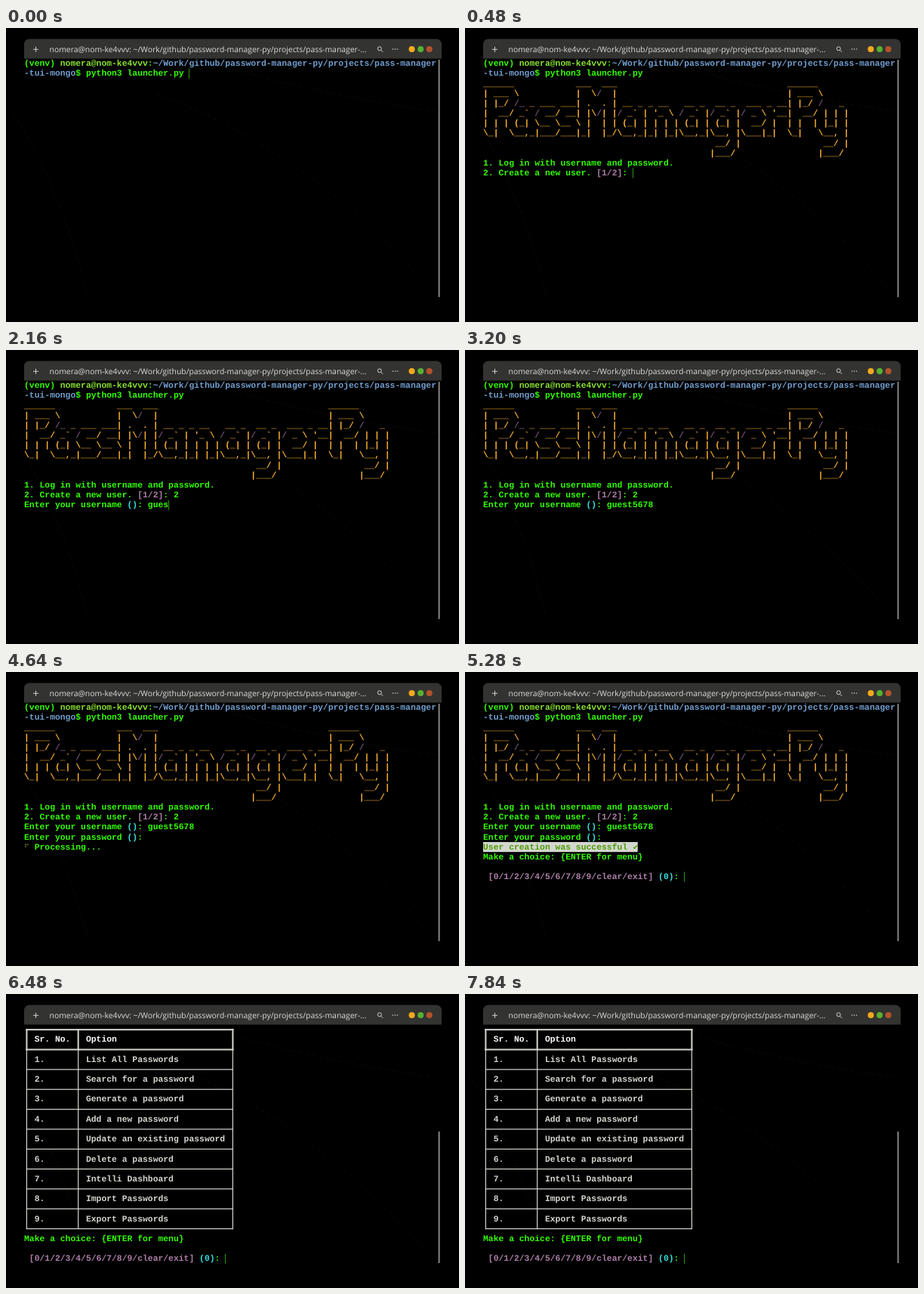
Animation, 600 px wide and 389 px high, one loop 8 s. Source, as an HTML page with a canvas:

```html
<!DOCTYPE html>
<html lang="en">
<head>
<meta charset="utf-8">
<title>Terminal session</title>
<style>
html, body { margin: 0; width: 100%; height: 100%; overflow: hidden; background: #000; }
canvas { display: block; }
</style>
</head>
<body>
<canvas id="stage" width="600" height="389"></canvas>
<script>
const ctx = document.getElementById("stage").getContext("2d");
const LOOP = 8000, LEFT = 24, TOP = 40.6, CELL_W = 6.825, CELL_H = 13.17;
const MONO = 'bold 11.375px "Liberation Mono", monospace';
const GREEN = "#33ff00", LIME = "#8ae234", BLUE = "#729fcf", CYAN = "#34e2e2",
      MAGENTA = "#ad7fa8", PURPLE = "#75507b", GOLD = "#fdb32f", SILVER = "#d3d7cf";
const USER = "nomera@nom-ke4vvv", LOGIN = "guest5678";
const PATH = "~/Work/github/password-manager-py/projects/pass-manager";

// Pieces of the banner: row, column, text
const BANNER = [
  [2, 0, "______"], [2, 18, "___  ___"], [2, 59, "______"],
  [3, 0, "| ___ \\"], [3, 18, "|  \\/  |"], [3, 59, "| ___ \\"],
  [4, 0, "| |_/ /_ _ ___ ___| .  . | __ _ _ __   __ _  __ _  ___ _ __| |_/ /   _"],
  [5, 0, "|  __/ _` / __/ __| |\\/| |/ _` | '_ \\ / _` |/ _` |/ _ \\ '__|  __/ | | |"],
  [6, 0, "| | | (_| \\__ \\__ \\ |  | | (_| | | | | (_| | (_| |  __/ |  | |  | |_| |"],
  [7, 0, "\\_|  \\__,_|___/___|_|  |_/\\__,_|_| |_|\\__,_|\\__, |\\___|_|  \\_|   \\__, |"],
  [8, 45, "__/ |"], [8, 66, "__/ |"],
  [9, 44, "|___/"], [9, 65, "|___/"],
];
const OPTIONS = ["List All Passwords", "Search for a password", "Generate a password",
  "Add a new password", "Update an existing password", "Delete a password",
  "Intelli Dashboard", "Import Passwords", "Export Passwords"];
const KEY_TIMES = [1840, 2000, 2080, 2160, 2240, 2400, 2480, 2800, 2880];

// Cursor: time, row, column; no row means hidden
const CURSOR = [
  [0, 1, 32], [80, 2, 0], [400, 11, 29], [720], [880, 11, 30], [1120, 12, 24], [1440], [1760, 12, 24],
  ...KEY_TIMES.map((t, i) => [t, 12, 25 + i]),
  [3200], [3440, 13, 24], [4640], [5280, 17, 39], [5600], [5920, 17, 39], [6240],
  [6480, 23, 39], [6800], [7200, 23, 39], [7520], [7840, 23, 39],
];

const colX = col => LEFT + col * CELL_W;
const rowY = row => TOP + row * CELL_H;

function rect(x, y, w, h, color) {
  ctx.fillStyle = color;
  ctx.fillRect(x, y, w, h);
}

function disc(x, y, r, color) {
  ctx.fillStyle = color;
  ctx.beginPath();
  ctx.arc(x, y, r, 0, 7);
  ctx.fill();
}

// Writes text/colour pairs one after another on the character grid
function print(row, col, ...parts) {
  ctx.font = MONO;
  for (let i = 0; i < parts.length; i += 2) {
    ctx.fillStyle = parts[i + 1];
    for (const ch of parts[i]) ctx.fillText(ch, colX(col++), rowY(row) + 9.7);
  }
}

function symbol(row, col, ch, color, size) {
  ctx.font = `${size}px "DejaVu Sans", sans-serif`;
  ctx.fillStyle = color;
  ctx.fillText(ch, colX(col), rowY(row) + 9.6);
}

function drawWindow(scrollTop) {
  rect(0, 0, 600, 389, "#000");
  ctx.lineWidth = 1;
  ctx.strokeStyle = "#0a0a05";
  ctx.setLineDash([5, 4]);
  ctx.stroke(new Path2D("M200 88Q400 160 560 345M5 105Q75 215 108 355M300 55Q450 95 570 110"));
  ctx.setLineDash([]);

  ctx.fillStyle = "#333432";
  ctx.beginPath();
  ctx.roundRect(24, 14.5, 553, 26, [7, 7, 0, 0]);
  ctx.fill();
  ctx.font = '10.4px "Open Sans", sans-serif';
  ctx.fillStyle = "#dcdcda";
  ctx.fillText(`${USER}: ${PATH}-…`, 57.5, 31.5);

  ctx.strokeStyle = "#d0d0ce";
  ctx.stroke(new Path2D("M36 28.3h7M39.5 24.8v7M496.7 29.3l2.5 2.5M497.3 27.3a2.5 2.5 0 1 1-5 0a2.5 2.5 0 1 1 5 0"));
  for (const x of [512.5, 515.5, 518.5]) disc(x, 28, 0.8, "#d0d0ce");
  disc(537.5, 28, 4, "#f6a91b");
  disc(549.2, 28, 4, "#57b12f");
  disc(560.7, 28, 4, "#b4532a");
  rect(572.6, scrollTop, 2, 356 - scrollTop, "#858583");
}

function drawBanner() {
  for (const [row, col, text] of BANNER) {
    print(row, col, text, GOLD);
    // Slashes that look like paths are tinted by the console highlighter
    for (const m of text.matchAll(/\B\/(?=([-\w.+]*))/g)) {
      for (let i = 0; i <= m[1].length; i++) rect(colX(col + m.index + i), rowY(row), CELL_W, CELL_H, "#000");
      print(row, col + m.index, "/", PURPLE, m[1], MAGENTA);
    }
  }
}

function drawChoice(row) {
  print(row, 0, "Make a choice: {ENTER for menu}", GREEN);
  print(row + 2, 1, "[0/1/2/3/4/5/6/7/8/9/clear/exit]", MAGENTA, " (0)", CYAN, ":", GREEN);
}

function drawSession(t) {
  print(0, 0, "(venv) ", GREEN, USER, LIME, ":", GREEN, PATH, BLUE);
  print(1, 0, "-tui-mongo", BLUE, "$ python3 launcher.py", GREEN);
  if (t >= 400) {
    drawBanner();
    print(10, 0, "1. Log in with username and password.", GREEN);
    print(11, 0, "2. Create a new user. ", GREEN, "[1/2]", MAGENTA, t < 880 ? ":" : ": 2", GREEN);
  }
  if (t >= 1120) {
    const typed = LOGIN.slice(0, KEY_TIMES.filter(k => k <= t).length);
    print(12, 0, "Enter your username ", GREEN, "()", CYAN, ": " + typed, GREEN);
  }
  if (t >= 3440) print(13, 0, "Enter your password ", GREEN, "()", CYAN, ":", GREEN);
  if (t >= 5280) {
    rect(LEFT, rowY(14), 30 * CELL_W, CELL_H, SILVER);
    print(14, 0, "User creation was successful", "#4e9a06");
    symbol(14, 29, "✔", "#4e9a06", 9.5);
    drawChoice(15);
  } else if (t >= 4640) {
    symbol(14, 0, "⠋⠙⠹⠸⠼⠴⠦⠧⠇⠏"[Math.floor((t - 4640) / 80)], "#9ab52a", 9.5);
    print(14, 2, "Processing...", GREEN);
  }
}

function drawMenu() {
  const middleX = col => colX(col + 0.5), middleY = row => rowY(row + 0.5);
  const rule = (x1, y1, x2, y2, w) => rect(x1 - w / 2, y1 - w / 2, x2 - x1 + w, y2 - y1 + w, SILVER);
  for (let row = 0; row <= 20; row += 2)
    rule(middleX(0), middleY(row), middleX(40), middleY(row), row < 3 ? 2 : 1.2);
  for (const col of [0, 10, 40]) {
    rule(middleX(col), middleY(0), middleX(col), middleY(2), 2);
    rule(middleX(col), middleY(2), middleX(col), middleY(20), 1.2);
  }
  print(1, 2, "Sr. No.", "#fff");
  print(1, 12, "Option", "#fff");
  OPTIONS.forEach((name, i) => {
    print(3 + 2 * i, 2, `${i + 1}.`, SILVER);
    print(3 + 2 * i, 12, name, SILVER);
  });
  drawChoice(21);
}

function frame(now) {
  const t = now % LOOP, inMenu = t >= 6480;
  ctx.textRendering = "geometricPrecision";
  drawWindow(inMenu ? 182 : 42);
  if (inMenu) drawMenu(); else drawSession(t);
  const [, row, col] = CURSOR.findLast(c => c[0] <= t);
  if (row) rect(Math.round(colX(col)), rowY(row), 1, CELL_H, "#239a0c");
  requestAnimationFrame(() => frame(performance.now() - start));
}

const start = performance.now();
frame(0);
</script>
</body>
</html>
```
